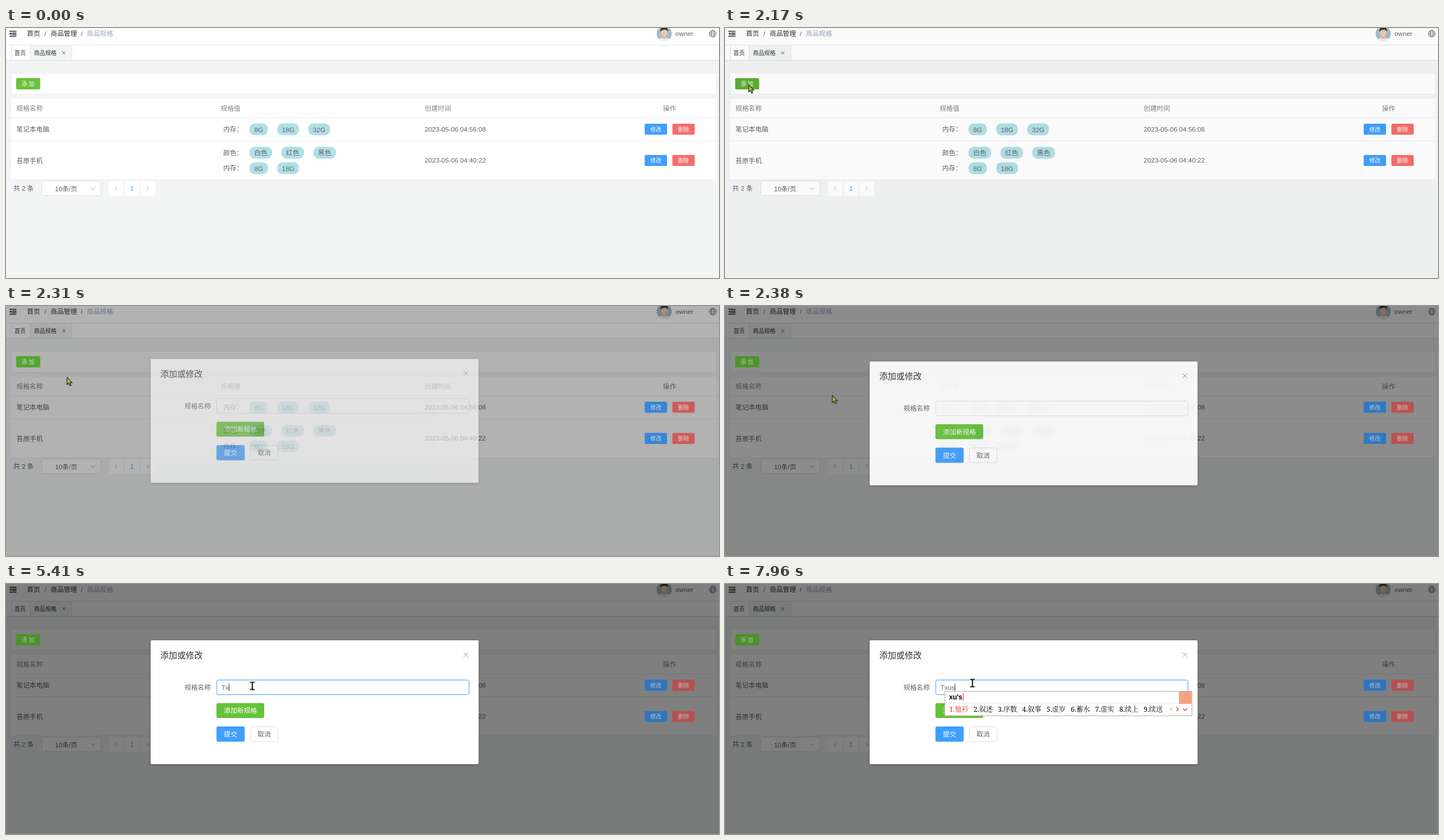
Recreate the animation shown at these times as an HTML page. Size 1262 by 444 pixels, loop 8000 ms.

```html
<!DOCTYPE html>
<html lang="zh-CN">
<head>
<meta charset="utf-8">
<title>商品规格</title>
<style>
  html, body { margin: 0; width: 100%; height: 100%; overflow: hidden; background: #f3f5f5; }
  svg { display: block; }
  text { font: 11.67px "Liberation Sans", "Noto Sans CJK SC", "Noto Sans CJK", sans-serif; fill: #606266; white-space: pre; }
  .mid { text-anchor: middle; }
  .small { font-size: 10px; }
  .white { fill: #fff; }
  .dark { fill: #303133; }
  .head text { fill: #7f8288; font-weight: 500; }
  .title { font-size: 15px; fill: #303133; }
  .pill { fill: #b0e0e6; }
  .line { fill: none; stroke: #ebeef5; }
  .icon { fill: none; stroke: #a8abb2; stroke-width: 1; }
  .green { fill: #67c23a; }
  .blue { fill: #409eff; }
  .red { fill: #f56c6c; }
  .pinyin { font-weight: bold; font-size: 12px; fill: #000; }
  .words text { font: 500 12px "Noto Serif", "Noto Serif CJK SC", "Noto Sans CJK SC", serif; fill: #000; }
  .words text:first-child { fill: #e8281c; }

  .anim { animation: 8s -4ms linear infinite; }
  #cursor { animation-name: move; }
  #arrow { animation-name: arrow; }
  #beam { animation-name: beam; }
  #shade { animation-name: shade; animation-timing-function: step-end; }
  #dialog { animation-name: dialog; animation-timing-function: step-end; }
  #buttons { animation-name: dim; animation-timing-function: step-end; }
  #add { animation-name: press; animation-timing-function: step-end; }
  #row1 { animation-name: row1; }
  #row2 { animation-name: row2; }
  #field { animation-name: focus; }

  @keyframes move {
    0%, 5.625% { transform: translate(981px, 420px); animation-timing-function: steps(5, end); }
    10% { transform: translate(273px, 281px); animation-timing-function: step-end; }
    12.484% { transform: translate(273px, 281px); animation-timing-function: steps(9, end); }
    20.5% { transform: translate(42px, 101px); animation-timing-function: step-end; }
    28.875% { transform: translate(108px, 127px); animation-timing-function: step-end; }
    29.75% { transform: translate(190px, 159px); animation-timing-function: step-end; }
    30.5% { transform: translate(270px, 173px); animation-timing-function: step-end; }
    31.4% { transform: translate(330px, 178px); animation-timing-function: step-end; }
    32.4% { transform: translate(362px, 181px); animation-timing-function: step-end; }
    33.5% { transform: translate(376px, 184px); animation-timing-function: step-end; }
    34.75% { transform: translate(376px, 184px); animation-timing-function: steps(8, end); }
    41.75% { transform: translate(436px, 181px); animation-timing-function: step-end; }
    86.875% { transform: translate(436px, 181px); animation-timing-function: steps(3, end); }
    90.125%, 100% { transform: translate(438px, 176px); }
  }
  @keyframes arrow {
    0% { visibility: hidden; animation-timing-function: step-end; }
    5.625% { visibility: visible; animation-timing-function: step-end; }
    33.5%, 100% { visibility: hidden; }
  }
  @keyframes beam {
    0% { visibility: hidden; animation-timing-function: step-end; }
    33.5%, 100% { visibility: visible; }
  }
  @keyframes shade {
    0% { opacity: 0; }
    27.125% { opacity: .02; }
    28.25% { opacity: .17; }
    28.875% { opacity: .3; }
    29.75% { opacity: .45; }
    30.5%, 100% { opacity: .5; }
  }
  @keyframes dim {
    0% { filter: brightness(1); }
    27.125% { filter: brightness(.98); }
    28.25% { filter: brightness(.9); }
    28.875% { filter: brightness(.84); }
    29.75% { filter: brightness(.76); }
    30.5%, 100% { filter: brightness(.74); }
  }
  @keyframes dialog {
    0% { opacity: 0; transform: translateY(-20px); }
    28.25% { opacity: .3; transform: translateY(-11px); }
    28.875% { opacity: .62; transform: translateY(-6px); }
    29.75% { opacity: .92; transform: translateY(-1.5px); }
    30.5%, 100% { opacity: 1; transform: none; }
  }
  @keyframes press {
    0% { fill: #67c23a; }
    19.6% { fill: #85ce61; }
    25.375% { fill: #5daf34; }
    28.25%, 100% { fill: #67c23a; }
  }
  @keyframes row2 {
    0%, 13.375% { fill: #fff; }
    16.5%, 16.94% { fill: #f5f7fa; }
    20%, 100% { fill: #fff; }
  }
  @keyframes row1 {
    0%, 16.94% { fill: #fff; }
    18.7% { fill: #f8f9fb; }
    20.5%, 100% { fill: #fff; }
  }
  @keyframes focus {
    0%, 33.5% { stroke: #dcdfe6; }
    36%, 42.625% { stroke: #c0c4cc; }
    45.25%, 100% { stroke: #409eff; }
  }
</style>
</head>
<body>
<svg width="1262" height="444" viewBox="0 0 1262 444">
  <rect width="1262" height="444" fill="#f3f5f5"/>

  <!-- header -->
  <rect width="1262" height="57" fill="#fff"/>
  <path d="M0 30.5H1262" stroke="#e1e2ee"/>
  <path d="M0 57.5H1262" stroke="#d8dce5"/>
  <path d="M6 5.8H18.500M11 9H18.500M11 11.500H18.500M6 14.500H18.500" stroke="#222" stroke-width="1.5"/>
  <path d="M6 10.200L9.800 7.600V12.800Z" fill="#222"/>
  <text class="dark" x="37" y="14">首页</text>
  <text x="68" y="14">/</text>
  <text class="dark" x="79" y="14">商品管理</text>
  <text x="132.500" y="14">/</text>
  <text x="143" y="14" style="fill:#97a8be">商品规格</text>
  <clipPath id="round"><circle cx="1165" cy="10" r="13.500"/></clipPath>
  <g clip-path="url(#round)">
    <circle cx="1165" cy="10" r="13.500" fill="#a1bdcd"/>
    <path d="M1153 25Q1154 17 1165 17T1177 25Z" fill="#e9eef4"/>
    <rect x="1162.500" y="12" width="5" height="7" fill="#e5b493"/>
    <ellipse cx="1165" cy="8" rx="6" ry="7.500" fill="#f2c8a8"/>
    <path d="M1158.500 7Q1157 -1 1165 -1T1171.500 7Q1170 2.500 1165 3T1158.500 7Z" fill="#3a3433"/>
  </g>
  <text x="1185" y="14">owner</text>
  <g fill="none" stroke="#6b6e75">
    <circle cx="1251" cy="10" r="6"/>
    <ellipse cx="1251" cy="10" rx="2.700" ry="6"/>
    <path d="M1245 10H1257M1246 7H1256M1246 13H1256" stroke-width=".8"/>
  </g>

  <!-- tabs -->
  <rect x="42" y="31" width="74" height="26" fill="#f3f5f5"/>
  <path d="M9.500 31V57M42.500 31V57M116.500 31V57" stroke="#dfe3ea"/>
  <text class="small dark" x="15" y="47.500">首页</text>
  <text class="small dark" x="49.500" y="47.500">商品规格</text>
  <path class="icon" d="M99.500 41.500L105 47M105 41.500L99.500 47" style="stroke:#55585e"/>

  <!-- toolbar and table -->
  <rect class="line" x="9.500" y="80.500" width="1248" height="37" style="fill:#fff"/>
  <rect x="9" y="126" width="1249" height="143" fill="#fff"/>
  <rect class="anim" id="row1" x="9" y="160" width="1249" height="40" fill="#fff"/>
  <rect class="anim" id="row2" x="9" y="201" width="1249" height="68" fill="#fff"/>
  <path class="line" d="M9 159.500H1258M9 200.500H1258M9 269.500H1258"/>
  <g class="head">
    <text x="18.500" y="147">规格名称</text>
    <text x="380" y="147">规格值</text>
    <text x="741" y="147">创建时间</text>
    <text class="mid" x="1174.500" y="147">操作</text>
  </g>
  <text x="18.500" y="184">笔记本电脑</text>
  <text x="18.500" y="239.500">苔原手机</text>
  <text x="741" y="184">2023-05-06 04:56:08</text>
  <text x="741" y="239">2023-05-06 04:40:22</text>
  <g id="specs"></g>

  <!-- pagination -->
  <text x="13" y="289">共 2 条</text>
  <rect x="63.500" y="272" width="104.500" height="25.500" rx="3" fill="#fff" stroke="#dcdfe6"/>
  <text class="mid" x="106.500" y="289.500">10条/页</text>
  <path class="icon" d="M150 283L154 287L158 283"/>
  <path d="M182 272h26v26h-26zM210 272h26v26h-26zM238 272h26v26h-26z" fill="#fff"/>
  <path class="icon" d="M196.500 281.500L193 285L196.500 288.500M249 281.500L252.500 285L249 288.500"/>
  <text class="mid" x="223" y="289" style="fill:#409eff">1</text>

  <rect class="anim" id="shade" width="1262" height="444" opacity="0"/>

  <g class="anim" id="buttons">
    <rect class="green anim" id="add" x="18" y="89" width="42.500" height="20" rx="2"/>
    <text class="small white" x="27.500" y="102.500">添 加</text>
  </g>

  <g class="anim" id="dialog" opacity="0">
    <rect x="256" y="100" width="580.500" height="220" rx="2" fill="#fff" style="filter:drop-shadow(0 1px 2px rgba(0,0,0,.3))"/>
    <text class="title" x="273" y="131.500">添加或修改</text>
    <path class="icon" d="M810 121.500L818 129.500M818 121.500L810 129.500" style="stroke:#909399"/>
    <text x="316" y="187.500">规格名称</text>
    <rect class="anim" id="field" x="373" y="170.500" width="446.500" height="26" rx="3" fill="#fff" stroke="#dcdfe6"/>
    <text id="typed" x="381.500" y="187.500"></text>
    <rect id="caret" y="177" width="1" height="13" fill="#303133"/>
    <rect class="green" x="372.500" y="211.500" width="84.500" height="26.500" rx="3"/>
    <text class="mid white" x="415" y="229.300">添加新规格</text>
    <rect class="blue" x="372.500" y="253" width="50" height="27" rx="3"/>
    <text class="mid white" x="397.500" y="271">提交</text>
    <rect x="432.500" y="253.500" width="49" height="26" rx="3" fill="#fff" stroke="#dcdfe6"/>
    <text class="mid" x="457" y="271">取消</text>
  </g>

  <!-- input method panel -->
  <g id="panel" visibility="hidden">
    <rect id="frame" x="389" y="190.500" height="43.500" fill="#fff" stroke="#a9a9a9"/>
    <path id="rule" stroke="#e6e6e6"/>
    <text class="pinyin" id="pinyin" x="396.500" y="205"></text>
    <rect id="mark" y="194" width="1" height="14" fill="#e03020"/>
    <g class="words" id="words"></g>
    <g id="tail" fill="none" stroke-width="1.6">
      <path d="M-35 219.500L-38 222.500L-35 225.500" stroke="#c8c8c8"/>
      <path d="M-27.500 219L-24 222.500L-27.500 226" stroke="#ee4a35"/>
      <path d="M-15.500 221L-12 224.500L-8.500 221" stroke="#ee4a35"/>
      <rect x="-23" y="191" width="22" height="22" fill="#f5a184"/>
    </g>
  </g>

  <g class="anim" id="cursor">
    <path class="anim" id="arrow" d="M0 0V12.500L2.900 9.900L5 14.800L7.300 13.800L5.200 9.100H9Z" fill="#9bcb3c" stroke="#1c1c1c" stroke-width="1.100" visibility="hidden"/>
    <path class="anim" id="beam" d="M-4 -6.500H4M0 -6.500V6.500M-4 6.500H4" fill="none" stroke="#26260c" stroke-width="2.200" visibility="hidden"/>
  </g>
</svg>

<script>
const $ = id => document.getElementById(id);

function add(parent, tag, attrs, text = '') {
  const el = document.createElementNS('http://www.w3.org/2000/svg', tag);
  for (const key in attrs) el.setAttribute(key, attrs[key]);
  el.textContent = text;
  parent.append(el);
}

function specRow(y, label, tags) {
  add($('specs'), 'text', { x: 384.500, y: y + 4 }, label + '：');
  let x = 431;
  for (const tag of tags) {
    const width = { '8G': 32.5, '18G': 38.5, '32G': 38.5 }[tag] || 40;
    add($('specs'), 'rect', { class: 'pill', x, y: y - 10.5, width, height: 21, rx: 9 });
    add($('specs'), 'text', { class: 'mid', x: x + width / 2, y: y + 4.5 }, tag);
    x += width + 16.5;
  }
}
specRow(180, '内存', ['8G', '18G', '32G']);
specRow(221.5, '颜色', ['白色', '红色', '黑色']);
specRow(249, '内存', ['8G', '18G']);

for (const y of [170, 225.5]) {
  [['修改', 'blue', 1130.5], ['删除', 'red', 1179.5]].forEach(([label, color, x]) => {
    add($('buttons'), 'rect', { class: color, x, y, width: 39.5, height: 19.5, rx: 2 });
    add($('buttons'), 'text', { class: 'small white mid', x: x + 19.75, y: y + 13.5 }, label);
  });
}

const LOOP = 8000;
const IME_START = 6470;
const typing = [
  [0, ''], [3940, 'T'], [4670, 'Tx'], [4750, 'Txu'], [5280, 'Tx'], [5410, 'T'],
  [IME_START, 'Tx'], [6600, 'Txu'], [6950, 'Txus'], [7610, 'Txush'], [7680, 'Txusha'],
  [7750, 'Txushan'], [7820, 'Txusha'], [7890, 'Txush'], [7950, 'Txus']
];
const candidates = {
  x: [...'想下小学新些先行性'],
  xu: [...'需须许虚续序绪蓄叙'],
  xus: '恤衫 叙述 序数 叙事 虚岁 蓄水 虚实 续上 续送'.split(' ')
};

function showPanel(keys) {
  const list = candidates[keys.slice(0, 3)];
  const pitch = 19 + 12 * list[0].length;
  const right = 397 + 9 * pitch + 42.5;
  $('frame').setAttribute('width', right - 389);
  $('rule').setAttribute('d', `M390 211.500H${right - 1}`);
  $('tail').setAttribute('transform', `translate(${right})`);
  $('pinyin').textContent = keys.replace(/^xu(?=s)/, "xu'");
  $('mark').setAttribute('x', 397.5 + $('pinyin').getComputedTextLength());
  $('words').replaceChildren();
  list.forEach((word, i) =>
    add($('words'), 'text', { x: 397 + pitch * i, y: 227 }, `${i + 1}.${word}`));
}

let shown;
function draw(now) {
  const t = (now + 4) % LOOP;
  const step = typing.findLast(([start]) => start <= t);
  if (step !== shown) {
    shown = step;
    const [start, value] = step;
    const ime = start >= IME_START;
    $('typed').textContent = value;
    $('caret').setAttribute('x', 381.3 + $('typed').getComputedTextLength());
    $('panel').setAttribute('visibility', ime ? 'visible' : 'hidden');
    if (ime) showPanel(value.slice(1));
  }
  const blink = (t >= 4470 && t < 4670) || (t >= 5810 && t < 6340);
  $('caret').setAttribute('visibility', t >= 3410 && !blink ? 'visible' : 'hidden');
}

// Share the clock of the CSS animations so typing and pointer stay in step.
const clock = $('cursor').getAnimations()[0];
function tick() {
  draw(Math.max(0, clock ? clock.currentTime || 0 : performance.now()));
  requestAnimationFrame(tick);
}
tick();
</script>
</body>
</html>
```
